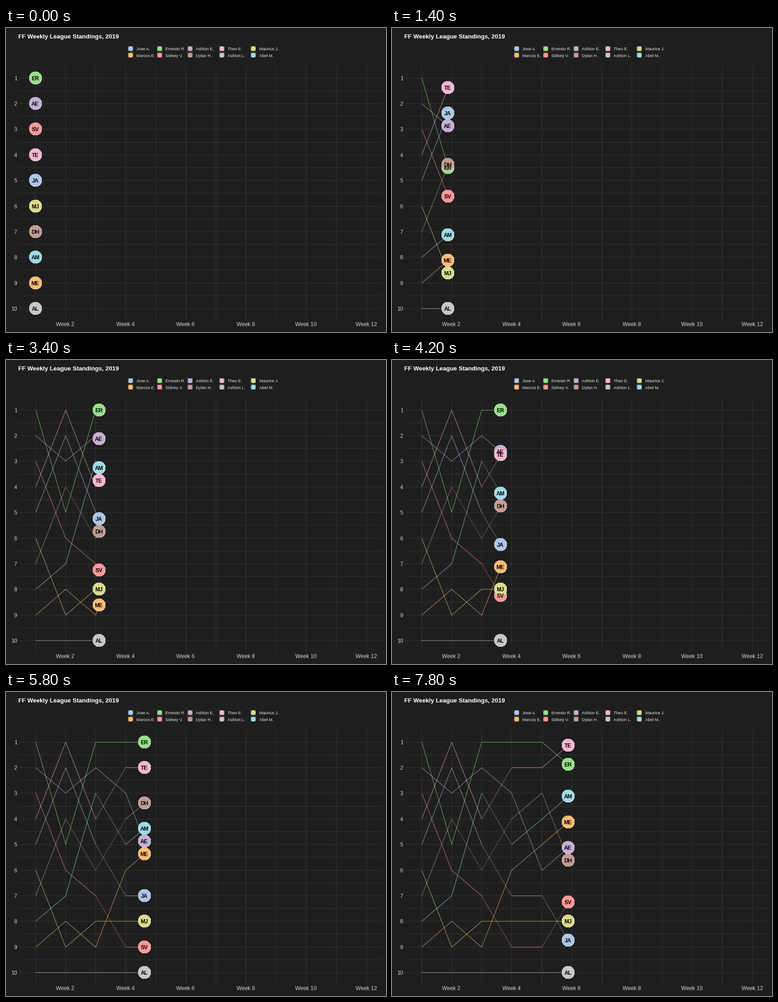
These frames come from a looping animation (837 px wide and 669 px high, 8000 ms). A matplotlib script:

```python
import math

import matplotlib.pyplot as plt
from matplotlib.animation import FuncAnimation
from matplotlib.collections import LineCollection
from matplotlib.colors import to_rgba
from matplotlib.patches import Circle, Rectangle

W, H, DPI = 837, 669, 64
PT = 72 / DPI                      # points per pixel
FRAMES, STEP_MS, PER_WEEK = 40, 200, 8
RADIUS = 13.5
BACK, GRID, LABEL = "#1e1e1e", "#333333", "#d3d3d3"

# name, colour, rank in weeks 1 to 6
TEAMS = [
    ("Jose A.", "#aec7e8", (5, 2, 5, 7, 7, 9)),
    ("Marcos E.", "#ffbb78", (9, 8, 9, 6, 5, 4)),
    ("Ernesto R.", "#98df8a", (1, 5, 1, 1, 1, 2)),
    ("Sidney V.", "#ff9896", (3, 6, 7, 9, 9, 7)),
    ("Ashton E.", "#c5b0d5", (2, 3, 2, 3, 6, 5)),
    ("Dylan H.", "#c49c94", (7, 4, 6, 4, 3, 6)),
    ("Theo E.", "#f7b6d2", (4, 1, 4, 2, 2, 1)),
    ("Ashton L.", "#c7c7c7", (10, 10, 10, 10, 10, 10)),
    ("Maurice J.", "#dbdb8d", (6, 9, 8, 8, 8, 8)),
    ("Abel M.", "#9edae5", (8, 7, 3, 5, 4, 3)),
]

plt.rcParams["font.family"] = "Liberation Sans"
fig = plt.figure(figsize=(W / DPI, H / DPI), dpi=DPI, facecolor=BACK)
ax = fig.add_axes([0, 0, 1, 1])
ax.set_xlim(0, W)
ax.set_ylim(H, 0)
ax.axis("off")


def px(week):
    """Pixel column of a week."""
    return math.floor(65.05 + 66.27 * (week - 1))


def py(rank):
    """Pixel row of a rank."""
    return math.floor(110.2 + 56.36 * (rank - 1))


def mid(week, rank):
    """Centre of the pixel where lines pass."""
    return px(week) + 0.5, py(rank) + 0.5


def label(x, y, text, size, color, **kw):
    return ax.text(x, y, text, fontsize=size * PT, color=color,
                   va="baseline", **kw)


def disc(color):
    return ax.add_patch(Circle((0, 0), RADIUS, facecolor=color,
                               edgecolor="none", antialiased=False, zorder=4))


def add_lines(segs, color, z):
    lines = LineCollection(segs, colors=[color], linewidths=PT, zorder=z,
                           capstyle="butt", snap=False)
    ax.add_collection(lines, autolim=False)
    return lines


def draw_grid():
    cols = [px(w) + 0.5 for w in range(1, 13)]
    rows = [py(1 + k / 2) + 0.5 for k in range(19)]
    add_lines([[(x, 84), (x, 642)] for x in cols]
              + [[(28, y), (829, y)] for y in rows], GRID, 1)
    for w in range(2, 13, 2):
        label(px(w) - 0.3, 656, f"Week {w}", 12, LABEL, ha="center")
    for r in range(1, 11):
        label(24.4, py(r) + 5, str(r), 12, LABEL, ha="right")


def draw_legend():
    columns = (274.5, 338.5, 405.5, 475.5, 545)
    for i, (name, color, _) in enumerate(TEAMS):
        x, y = columns[i // 2], 45.5 + 14.4 * (i % 2)
        ax.add_patch(Rectangle((x - 5.5, y - 5.5), 11, 11, edgecolor="none",
                               facecolor=to_rgba(color, 0.55), zorder=2))
        ax.add_patch(Circle((x, y), 5, facecolor=color, edgecolor="none",
                            zorder=3))
        label(x + 12.7, y + 3.7, name, 9.1, "#e6e6e6")


def trail(ranks, t):
    """Segments up to week offset t, with widths; two-rank moves look thin."""
    segs, widths = [], []
    for k in range(math.ceil(t)):
        a, b = ranks[k], ranks[k + 1]
        part = min(1, t - k)
        segs.append([mid(k + 1, a), mid(k + 1 + part, a + (b - a) * part)])
        widths.append((0.9 if abs(b - a) == 2 else 1.35) * PT)
    return segs, widths


def rank_at(ranks, t):
    k = int(t)
    return ranks[k] + (ranks[k + 1] - ranks[k]) * (t - k)


def add_team(name, color, ranks):
    line = add_lines([], to_rgba(color, 0.55), 2)
    rim, dot = disc("white"), disc(color)
    initials = name[0] + name.split()[1][0]
    tag = label(0, 0, initials, 12, "black", weight="bold", ha="center",
                zorder=5)
    return ranks, line, rim, dot, tag


draw_grid()
draw_legend()
label(27.5, 23, "FF Weekly League Standings, 2019", 13.35, "white",
      weight="bold")
teams = [add_team(*team) for team in TEAMS]


def update(frame):
    t = frame / PER_WEEK
    x = px(1 + t)
    changed = []
    for ranks, line, rim, dot, tag in teams:
        y = py(rank_at(ranks, t))
        segs, widths = trail(ranks, t)
        line.set_segments(segs)
        line.set_linewidths(widths or [PT])
        rim.center = (x + 0.25, y + 0.25)
        dot.center = (x - 0.25, y - 0.25)
        tag.set_position((x - 0.5, y + 5))
        changed += [line, rim, dot, tag]
    return changed


anim = FuncAnimation(fig, update, frames=FRAMES, interval=STEP_MS,
                     init_func=lambda: update(0), repeat=True,
                     repeat_delay=0, blit=False)
plt.show()
```
